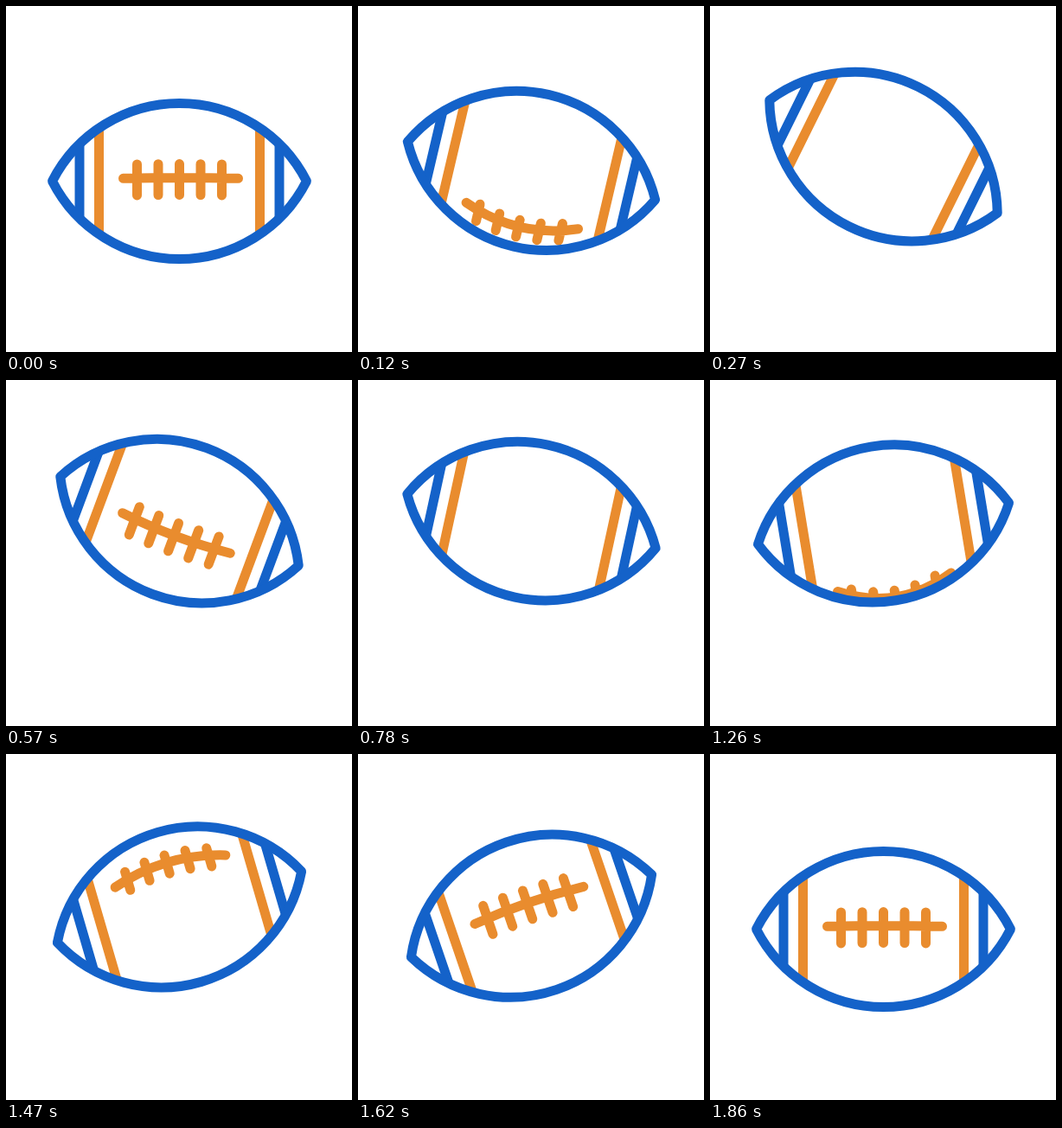
An HTML page for the animation above (1.92 s loop, 400 by 400 pixels).

```html
<!DOCTYPE html>
<html lang="en">
<head>
<meta charset="utf-8">
<title>Spinning football</title>
<style>
  html, body { margin: 0; width: 100%; height: 100%; overflow: hidden; background: #fff; }
  svg { display: block; width: 100vw; height: 100vh; }
  path { fill: none; stroke-width: 11; }
  .blue { stroke: #1462c9; }
  .orange { stroke: #e98c2e; }
  .round { stroke-linecap: round; stroke-linejoin: round; }
</style>
</head>
<body>
<svg viewBox="0 0 400 400">
  <clipPath id="inside"><path d="M-147 0A165 165 0 0 1 147 0A165 165 0 0 1 -147 0Z"/></clipPath>
  <g id="ball">
    <g clip-path="url(#inside)">
      <path class="orange" d="M-93 -90V90M93 -90V90"/>
      <path class="blue" d="M-115.5 -90V90M115.5 -90V90"/>
      <path id="lace" class="orange round"/>
    </g>
    <path class="blue round" d="M-147 0A165 165 0 0 1 147 0A165 165 0 0 1 -147 0Z"/>
  </g>
</svg>
<script>
const LOOP = 1920, STEP = 30, END = 1860;
const GROUND = 202.5, LIFT = 39.4;
const ball = document.getElementById('ball');
const lace = document.getElementById('lace');

const progress = (t, from, to) => Math.min(1, Math.max(0, (t - from) / (to - from)));
const smooth = p => p * p * (3 - 2 * p);
const gather = p => p * p * (2 - p);

// The ball shoots up, hangs, then drops back.
function height(t) {
  const below = gather(1 - progress(t, 0, 465)) + gather(progress(t, 1110, END));
  return GROUND - LIFT * (1 - below);
}

// The nose dips, swings slowly over to the other side and levels out.
function tilt(t) {
  const dip = 26.4, rise = 19.3;
  return dip * smooth(progress(t, 0, 240))
    - (dip + rise) * smooth(progress(t, 240, 1700))
    + rise * smooth(progress(t, 1700, END));
}

// The lace rolls down the front again and again, then glides to its resting place.
function laceY(t) {
  const rest = -4, top = 104, turn = 268, lastRoll = 1360;
  if (t >= lastRoll) return rest - top * (1 - progress(t, lastRoll, END)) ** 3;
  const rolled = .4875 * t + 12 * smooth(progress(t, 0, 120));
  return rest + (rolled + top) % turn - top;
}

function lacePath(y) {
  const half = Math.max(10, 18 - 20 * (y / 90) ** 2);
  let d = `M-65 ${.8 * y}Q1.5 ${1.2 * y} 68 ${.8 * y}`;
  for (let i = -2; i <= 2; i++) {
    const x = i * 24.5;
    const mid = y * (1 - .2 * (x / 67) ** 2) + 2;
    d += `M${x} ${mid - half}V${mid + half}`;
  }
  return d;
}

function draw(now) {
  const t = Math.min(END, Math.floor((now % LOOP) / STEP) * STEP);
  ball.setAttribute('transform', `translate(200.5 ${height(t)}) rotate(${tilt(t)})`);
  lace.setAttribute('d', lacePath(laceY(t)));
}

let start;
function tick(now) {
  start ??= now;
  draw(now - start);
  requestAnimationFrame(tick);
}
draw(0);
requestAnimationFrame(tick);
</script>
</body>
</html>
```
